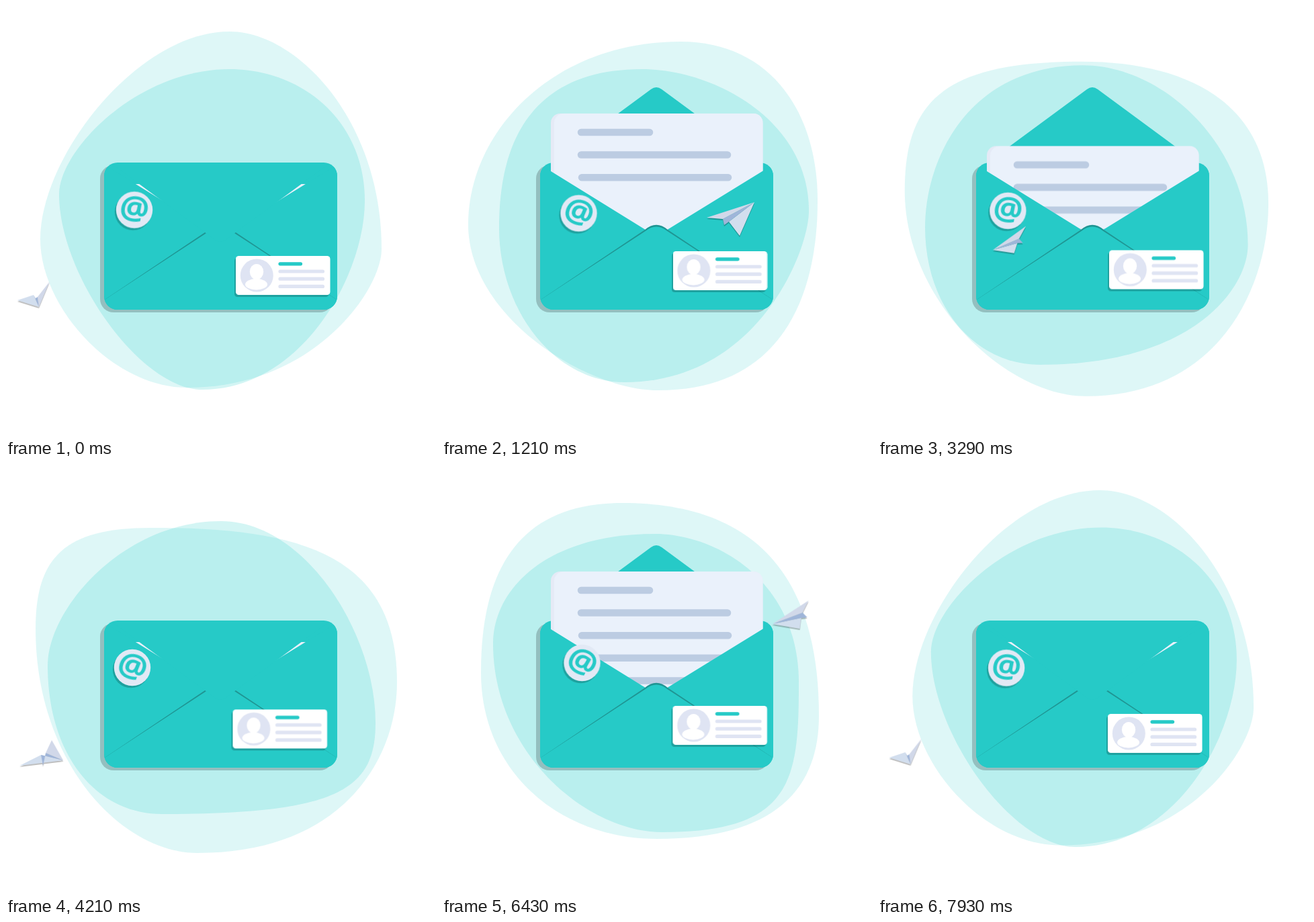
These frames come from a looping animation (640x640 px, 8000 ms). An HTML page without scripts:

```html
<!DOCTYPE html>
<html lang="en">
<head>
<meta charset="utf-8">
<title>Mail</title>
<style>
html, body { margin: 0; height: 100%; overflow: hidden; background: #fff; }
svg { display: block; width: 100%; height: 100%; }

:root { --teal: #26cac7; --pale: #dfe4f3; }
.teal { fill: var(--teal); }
.fall { filter: drop-shadow(-2px 3px 0 rgba(0, 0, 0, .2)); }

/* backdrop */
.blob { fill: var(--teal); animation: outer 8s linear infinite; }
.outer { opacity: .15; }
.inner { opacity: .2; animation-name: inner; }

@keyframes outer {
  0%, 100% { d: path("M51 347C51 225 195 38 333 38C433 38 559 170 559 362C559 421 460 568 270 568C157 568 51 447 51 347Z"); }
  15.1% { d: path("M39 325C39 189 163 53 355 53C485 53 559 153 559 290C559 421 513 572 322 572C214 572 39 462 39 325Z"); }
  31.3% { d: path("M36 300C36 145 106 72 378 72C491 72 571 157 571 265C571 382 522 577 325 577C206 577 36 430 36 300Z"); }
  46.9% { d: path("M42 260C42 140 93 89 259 89C446 89 587 140 587 312C587 430 506 583 300 583C181 583 42 443 42 260Z"); }
  52.6% { d: path("M44 245C44 138 88 95 215 95C430 95 582 130 582 325C582 440 500 579 285 579C172 579 44 445 44 245Z"); }
  65.1% { d: path("M54 275C54 156 98 74 235 74C418 74 568 125 568 350C568 455 517 565 297 565C181 565 54 445 54 275Z"); }
  80.4% { d: path("M58 310C58 166 108 58 268 58C430 58 561 130 561 375C561 470 511 558 320 558C176 558 58 459 58 310Z"); }
}
@keyframes inner {
  0%, 100% { d: path("M79 280C79 215 195 94 333 94C440 94 534 170 534 290C534 400 440 571 292 571C200 571 79 400 79 280Z"); }
  15.1% { d: path("M85 330C85 231 113 94 298 94C402 94 546 168 546 305C546 365 469 560 272 560C169 560 85 455 85 330Z"); }
  31.3% { d: path("M77 355C77 240 99 91 292 91C408 91 551 169 551 330C551 365 445 545 250 545C147 545 77 454 77 355Z"); }
  52.6% { d: path("M62 300C62 215 175 85 320 85C445 85 550 252 550 385C550 484 496 521 232 521C133 521 62 432 62 300Z"); }
  65.1% { d: path("M71 283C71 202 167 98 318 98C435 98 538 202 538 378C538 486 479 531 330 531C195 531 71 465 71 283Z"); }
  80.4% { d: path("M76 267C76 188 153 104 317 104C408 104 531 174 531 325C531 468 524 548 328 548C215 548 76 430 76 267Z"); }
}

/* envelope, opening twice per loop */
.flap { transform-origin: 319px 236px; animation: back 4s linear infinite; }
.front { animation-name: front; }
.letter { animation: rise 4s ease-in-out infinite; }
@keyframes back {
  0%, 10.5%, 91%, 100% { transform: scaleY(0); }
  15%, 87% { transform: scaleY(1); }
}
@keyframes front {
  0%, 6%, 95%, 100% { transform: scaleY(-1); }
  10.5%, 91% { transform: scaleY(0); }
  10.6%, 90.9% { transform: scaleY(0); }
}
@keyframes rise {
  0%, 12.5%, 87.5%, 100% { transform: translateY(105px); }
  22.5%, 77.5% { transform: none; }
}

.line {
  fill: none; stroke: #bccce2; stroke-width: 10.5; stroke-linecap: round;
  stroke-dasharray: 100 300; animation: write 4s linear infinite backwards;
}
@keyframes write {
  0%, 75.01%, 100% { stroke-dashoffset: 110; }
  5%, 75% { stroke-dashoffset: 0; }
}

/* floating badges */
.at { animation: at 8s ease-in-out infinite; }
.spin { animation: spin 8s ease-in-out infinite; }
.at text { font: 700 49px "Open Sans", "Noto Sans", sans-serif; text-anchor: middle; fill: var(--teal); }
@keyframes at {
  0%, 100% { transform: translate(191px, 303.5px); }
  15.1% { transform: translate(203.5px, 308.5px); }
  31.3% { transform: translate(197.5px, 306px); }
  52.6% { transform: translate(188px, 303px); }
  65.1% { transform: translate(178.5px, 303.5px); }
  80.4% { transform: translate(208.5px, 296px); }
}
@keyframes spin {
  0%, 100% { transform: rotate(8deg); }
  15.1% { transform: rotate(20deg); }
  31.3% { transform: rotate(0deg); }
  52.6% { transform: rotate(19deg); }
  65.1% { transform: rotate(-2deg); }
  80.4% { transform: rotate(27deg); }
}
.card { animation: card 8s ease-in-out infinite; }
.card path { fill: none; stroke: var(--pale); stroke-width: 5.2; stroke-linecap: round; }
.card .name { stroke: var(--teal); }
@keyframes card {
  0%, 100% { transform: translate(342px, 372px); }
  15.1% { transform: translate(343.5px, 365px); }
  31.3% { transform: translate(349px, 362px); }
  52.6% { transform: translate(337.5px, 365.4px); }
  65.1% { transform: translate(345.5px, 364.6px); }
  80.4% { transform: translate(343.4px, 360px); }
}

/* paper plane: the nose travels, the wings turn around it */
.plane { filter: drop-shadow(0 2px 0 rgba(0, 0, 0, .25)); }
.fly { animation: fly 4s linear infinite; }
.fly path { animation: left 4s linear infinite; }
.fly .fold { animation-name: fold; }
.fly .right { animation-name: right; }
@keyframes fly {
  0%, 100% { transform: translate(49px, 448px); }
  2.5% { transform: translate(60px, 450px); }
  5.25% { transform: translate(85px, 441px); }
  9% { transform: translate(112px, 436px); }
  16% { transform: translate(270px, 385px); animation-timing-function: ease-out; }
  27.5%, 32% { transform: translate(465px, 292px); }
  37.5% { transform: translate(520px, 258px); }
  42.8% { transform: translate(574px, 214px); }
  46.5% { transform: translate(576px, 200px); }
  51% { transform: translate(549px, 208px); }
  60.75% { transform: translate(492px, 238px); }
  62.5% { transform: translate(462px, 248px); }
  77.5% { transform: translate(225px, 335px); }
  92.75% { transform: translate(52px, 425px); }
  98.25% { transform: translate(48.5px, 447px); }
}
@keyframes left {
  0%, 98%, 100% { d: path("M0 0L16 -38L-2 -15Z"); }
  5.25% { d: path("M0 0L-17 -30L-26 -11Z"); }
  22%, 33% { d: path("M0 0L-71 23L-47 25Z"); }
  44% { d: path("M0 0L-8 62L2 46Z"); }
  52%, 80% { d: path("M0 0L54 -35L45 -17Z"); }
}
@keyframes fold {
  0%, 98%, 100% { d: path("M0 0L-2 -15L-5 -13L-8 -18Z"); }
  5.25% { d: path("M0 0L-26 -11L-30 8L-33 -8Z"); }
  22%, 33% { d: path("M0 0L-47 25L-45 34L-38 29Z"); }
  44% { d: path("M0 0L2 46L10 52L9 44Z"); }
  52%, 80% { d: path("M0 0L45 -17L52 -10L43 -9Z"); }
}
@keyframes right {
  0%, 98%, 100% { d: path("M0 0L-8 -18L-32 -10Z"); }
  5.25% { d: path("M0 0L-33 -8L-65 8Z"); }
  22%, 33% { d: path("M0 0L-38 29L-22 50Z"); }
  44% { d: path("M0 0L9 44L40 40Z"); }
  52%, 80% { d: path("M0 0L43 -9L41 7Z"); }
}
</style>
</head>
<body>
<svg viewBox="0 0 640 640">
  <defs>
    <rect id="body" x="146" y="233" width="347" height="219" rx="20"/>
    <path id="flap" d="M159 236L311 124Q319 118 327 124L479 236Z"/>
    <clipPath id="case"><use href="#body"/></clipPath>
  </defs>

  <path class="blob outer" d="M51 347C51 225 195 38 333 38C433 38 559 170 559 362C559 421 460 568 270 568C157 568 51 447 51 347Z"/>
  <path class="blob inner" d="M79 280C79 215 195 94 333 94C440 94 534 170 534 290C534 400 440 571 292 571C200 571 79 400 79 280Z"/>

  <use href="#body" x="-6" y="4" opacity=".2"/>
  <g class="teal">
    <use class="flap" href="#flap"/>
    <use href="#body"/>
  </g>

  <g class="letter">
    <rect x="162" y="160" width="315.5" height="185" rx="14" fill="#e5eaf6"/>
    <rect x="167" y="160" width="310.5" height="185" rx="14" fill="#eaf1fb"/>
    <path class="line" pathLength="100" d="M207 188H309" style="animation-delay:.65s"/>
    <path class="line" pathLength="100" d="M207 221.5H425" style="animation-delay:.83s"/>
    <path class="line" pathLength="100" d="M208 255.2H426" style="animation-delay:1s"/>
    <path class="line" pathLength="100" d="M208 288.8H426" style="animation-delay:1.23s"/>
    <path class="line" pathLength="100" d="M208 322.5H426" style="animation-delay:1.43s"/>
  </g>

  <g class="teal" clip-path="url(#case)">
    <path d="M146 236L319 343L493 236V452H146Z"/>
    <path d="M147 437L302 333Q319 318.5 336 333L492 437Z" fill="#1f9593"/>
    <path d="M147 437L302 335.5Q319 321.5 336 335.5L492 437V452H147Z"/>
  </g>
  <use class="flap front teal" href="#flap"/>

  <g class="fall">
    <g class="at">
      <circle r="27.2" fill="#e2e9f5"/>
      <g class="spin"><text y="15">@</text></g>
    </g>
  </g>

  <g class="fall">
    <g class="card">
      <rect width="140.5" height="58" rx="4.5" fill="#fff"/>
      <circle cx="31.3" cy="29" r="24.5" fill="#dfe4f3"/>
      <g fill="#fff">
        <ellipse cx="31" cy="23.5" rx="10.2" ry="11.5"/>
        <rect x="26.5" y="29" width="9" height="9"/>
        <ellipse cx="30.5" cy="42.3" rx="16.5" ry="8.2"/>
      </g>
      <path class="name" d="M66 11.8H96.5"/>
      <path d="M66 23H129.5M66 34.2H129.5M66 45.4H129.5"/>
    </g>
  </g>

  <g class="plane">
    <g class="fly">
      <path class="right" d="M0 0L-8 -18L-32 -10Z" fill="#d2deee"/>
      <path class="fold" d="M0 0L-2 -15L-5 -13L-8 -18Z" fill="#9fb5d9"/>
      <path class="left" d="M0 0L16 -38L-2 -15Z" fill="#d1d8e9"/>
    </g>
  </g>
</svg>
</body>
</html>
```
